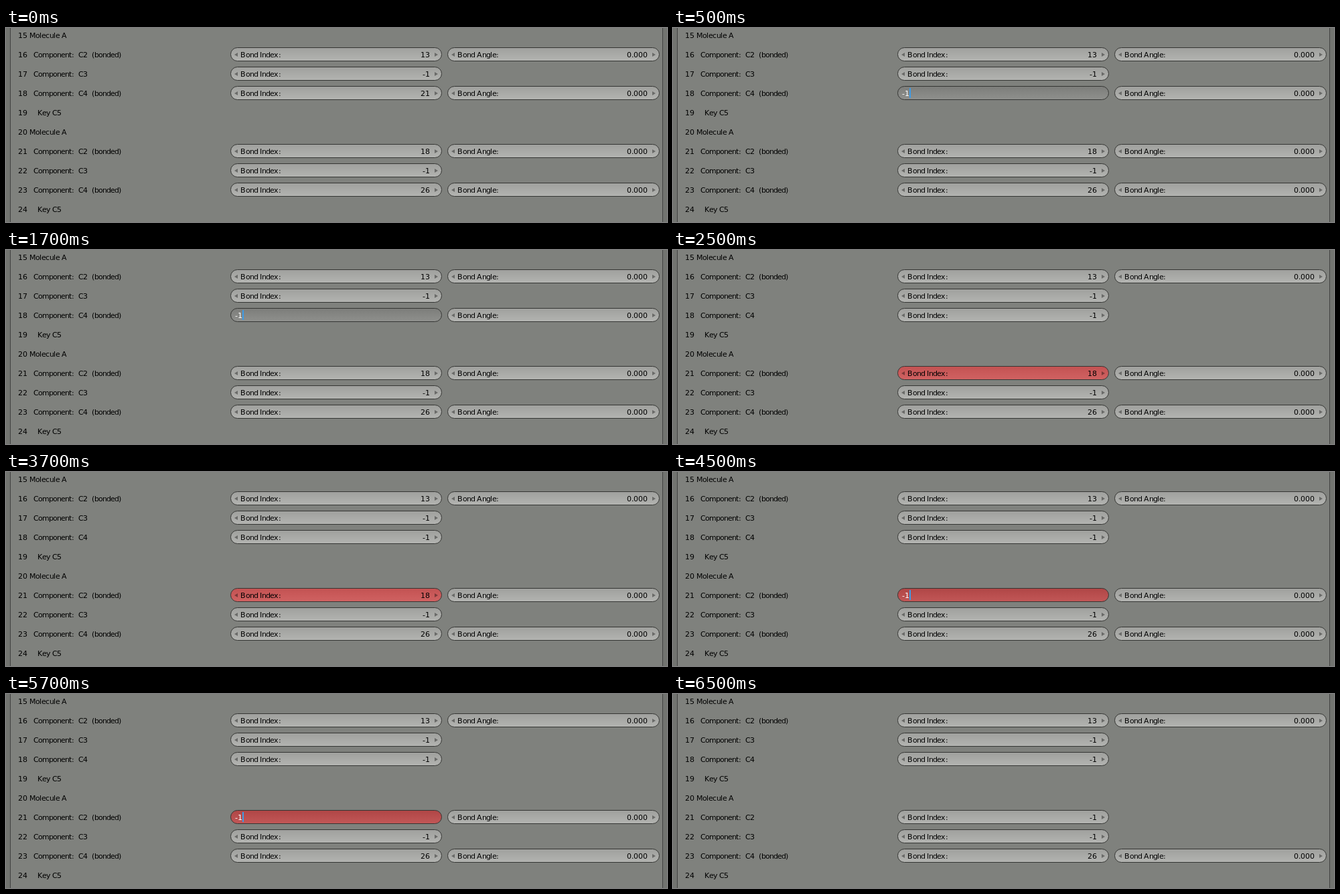
An HTML page for the animation above (8000 ms loop, 987 px wide and 291 px high).

```html
<!DOCTYPE html>
<html lang="en">
<head>
<meta charset="utf-8">
<title>Bond index list</title>
<style>
  html, body { margin: 0; width: 100%; height: 100%; overflow: hidden; background: #7f817d; }
  svg { display: block; }
  text { font: 11px "DejaVu Sans", sans-serif; white-space: pre; }
</style>
</head>
<body>
<svg id="stage" width="987" height="291" viewBox="0 0 987 291">
  <defs>
    <linearGradient id="idle" x2="0" y2="1"><stop stop-color="#9fa09d"/><stop offset="1" stop-color="#b3b4b1"/></linearGradient>
    <linearGradient id="edit" x2="0" y2="1"><stop stop-color="#7c7d7a"/><stop offset="1" stop-color="#8f908d"/></linearGradient>
    <linearGradient id="alert" x2="0" y2="1"><stop stop-color="#c35252"/><stop offset="1" stop-color="#d06262"/></linearGradient>
    <linearGradient id="alertEdit" x2="0" y2="1"><stop stop-color="#b04646"/><stop offset="1" stop-color="#c25757"/></linearGradient>
  </defs>
  <rect width="987" height="291" fill="#7f817d"/>
  <path d="M0 0h6v291h-6zM981 0h6v291h-6z" fill="#727470"/>
  <path d="M6.5 0v291M980.5 0v291" stroke="#424341"/>
  <g id="rows"></g>
</svg>
<script>
const LOOP = 8000;
const STEPS = [500, 2500, 4500, 6500];
const rowsNode = document.getElementById('rows');

// Whole-pixel glyph advances of the interface font; all other glyphs take 6.
const ADVANCES = { ' Il.': 3, ':t()-': 4, '0123456789CKx': 7, 'AB': 8, 'M': 9, 'm': 10 };
const advance = ch => {
  const set = Object.keys(ADVANCES).find(key => key.includes(ch));
  return set ? ADVANCES[set] : 6;
};
const textWidth = str => [...str].reduce((sum, ch) => sum + advance(ch), 0);

function label(str, x, y, fill = '#000') {
  const xs = [...str].map(ch => { const at = x; x += advance(ch); return at; });
  return `<text x="${xs.join(' ')}" y="${y + 4}" fill="${fill}">${str}</text>`;
}

function field(x, width, y, name, value, look = 'idle') {
  const end = x + width + 1;
  const box = `<rect x="${x + .5}" y="${y - 10.5}" width="${width}" height="20" rx="10" fill="url(#${look})" stroke="#343533"/>`;
  if (/edit/i.test(look)) {
    const caret = x + 7 + textWidth(value);
    return box + label(value, x + 7, y, '#fff') +
      `<rect x="${caret}" y="${y - 8}" width="2" height="15" fill="#3d9be6"/>`;
  }
  const arrows = `<path d="M${x + 6} ${y}l5 -3v6zM${end - 6} ${y}l-5 -3v6z" fill="#000" fill-opacity=".38"/>`;
  return box + arrows + label(name, x + 15, y) +
    label(value, end - 18 - textWidth(value), y);
}

function component(id, y, name, bond, look) {
  const bonded = bond !== '-1' || /edit/i.test(look);
  const shown = /edit/i.test(look) ? '-1' : bond;
  return label(`${id}   Component:  ${name}${bonded ? '  (bonded)' : ''}`, 18, y) +
    field(335, 315, y, 'Bond Index:', shown, look) +
    (bonded ? field(659, 316, y, 'Bond Angle:', '0.000') : '');
}

function draw(step) {
  const rows = [
    ['Molecule A'],
    ['C2', '13'],
    ['C3', '-1'],
    ['C4', step < 2 ? '21' : '-1', step === 1 ? 'edit' : 'idle'],
    ['    Key C5'],
    ['Molecule A'],
    ['C2', step < 4 ? '18' : '-1', { 2: 'alert', 3: 'alertEdit' }[step] || 'idle'],
    ['C3', '-1'],
    ['C4', '26'],
    ['    Key C5']
  ];
  rowsNode.innerHTML = rows.map(([name, bond, look], i) => {
    const id = 15 + i, y = 11 + 29 * i;
    return bond ? component(id, y, name, bond, look) : label(`${id} ${name}`, 18, y);
  }).join('');
}

let shownStep = -1;
const start = performance.now();
function tick() {
  const time = (performance.now() - start) % LOOP;
  const step = STEPS.filter(at => time >= at).length;
  if (step !== shownStep) draw(shownStep = step);
  requestAnimationFrame(tick);
}
tick();
</script>
</body>
</html>
```
